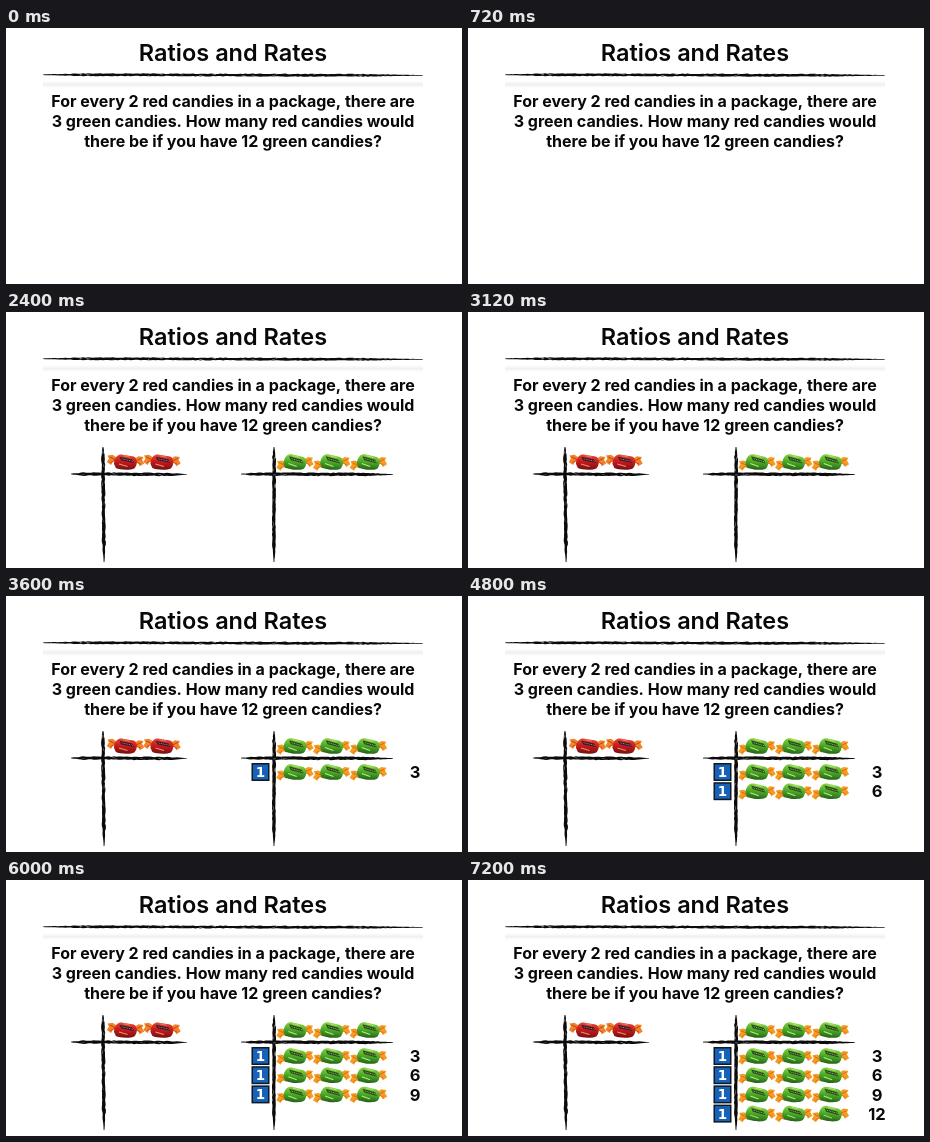
Animation of 456x256 px, one loop 8000 ms. Source, as an HTML page with a canvas:

```html
<!DOCTYPE html>
<html lang="en">
<head>
<meta charset="utf-8">
<title>Ratios and Rates</title>
<style>
  html, body { margin: 0; width: 100%; height: 100%; overflow: hidden; background: #fff; }
  canvas { display: block; width: 456px; height: 256px; }
</style>
</head>
<body>
<canvas id="stage" width="456" height="256"></canvas>
<script>
const ctx = document.getElementById('stage').getContext('2d');
const LOOP = 8000, STEP = 1200;
const SANS = 'Inter, Lato, sans-serif';

function text(str, x, y, size, weight = 700, color = '#080808', family = SANS) {
  ctx.font = `${weight} ${size}px ${family}`;
  ctx.textAlign = 'center';
  ctx.fillStyle = color;
  ctx.fillText(str, x, y);
}

function seeded(seed) {
  return () => (seed = (seed * 16807) % 2147483647) / 2147483647;
}

// A rough, tapering ink stroke
function brush(x1, y1, x2, y2, width, seed) {
  const rnd = seeded(seed);
  const length = Math.hypot(x2 - x1, y2 - y1);
  const count = Math.round(length / 2.5);
  const upper = [], lower = [];
  for (let i = 0; i <= count; i++) {
    const u = i / count;
    const half = width / 2 * Math.min(1, 0.3 + 7 * u, 0.2 + 5 * (1 - u));
    upper.push([u * length, -half * (0.75 + 0.5 * rnd())]);
    lower.unshift([u * length, half * (0.75 + 0.5 * rnd())]);
  }
  ctx.save();
  ctx.translate(x1, y1);
  ctx.rotate(Math.atan2(y2 - y1, x2 - x1));
  shape('#0b0b0b', [...upper, ...lower]);
  ctx.fillStyle = 'rgba(255,255,255,.5)';
  for (let i = 0; i < length / 14; i++) {
    ctx.fillRect(rnd() * length, (rnd() - 0.5) * width, 1 + rnd() * 3, 0.6);
  }
  ctx.restore();
}

function shape(color, points) {
  ctx.fillStyle = color;
  ctx.beginPath();
  points.forEach(([x, y]) => ctx.lineTo(x, y));
  ctx.closePath();
  ctx.fill();
}

function line(color, width, x1, y1, x2, y2) {
  ctx.strokeStyle = color;
  ctx.lineWidth = width;
  ctx.beginPath();
  ctx.moveTo(x1, y1);
  ctx.lineTo(x2, y2);
  ctx.stroke();
}

// Twisted wrapper end; dir is -1 for left, 1 for right
function twist(dir, dy, color, shade) {
  const at = (x, y) => [dir * x, y + dy];
  shape(color, [at(12, -3), at(18, -7), at(25, -6), at(23, -2), at(26, 3), at(20, 7), at(17, 2), at(12, 4)]);
  line(shade, 1.2, dir * 14, dy, dir * 22, dy - 4);
  line(shade, 1, dir * 15, dy + 1, dir * 21, dy + 4);
}

const RED = {
  ends: [-3, -1], tilt: 0.04, end: '#f0842a', endShade: '#b93212',
  body: ['#e54634', '#c5191b', '#70100f'], label: '#3b1a2b', accent: '#e9a18c', shine: '#f58d75'
};
const GREEN = {
  ends: [5, 0], tilt: 0.1, end: '#f59b24', endShade: '#cf650c',
  body: ['#8bd443', '#4aa927', '#246018'], label: '#284b22', accent: '#d2cf55', shine: '#b7ee7b'
};

function candy(kind, x, y, scale) {
  ctx.save();
  ctx.translate(x, y);
  ctx.scale(scale, scale);
  twist(-1, kind.ends[0], kind.end, kind.endShade);
  twist(1, kind.ends[1], kind.end, kind.endShade);
  ctx.rotate(kind.tilt);

  const fill = ctx.createLinearGradient(0, -10, 0, 11);
  kind.body.forEach((color, i) => fill.addColorStop(i / 2, color));
  ctx.fillStyle = fill;
  ctx.beginPath();
  ctx.moveTo(-16, 3);
  ctx.bezierCurveTo(-15, -8, -10, -11, -4, -10);
  ctx.lineTo(11, -8);
  ctx.bezierCurveTo(17, -6, 17, 4, 13, 8);
  ctx.bezierCurveTo(7, 12, -8, 11, -13, 9);
  ctx.closePath();
  ctx.fill();

  shape(kind.label, [[-9, -7], [9, -4], [12, 1], [-6, -2]]);
  for (let i = 0; i < 5; i++) {
    const px = -5 + i * 3.3;
    line(kind.accent, 1, px, -4.7 + i * 0.6, px + 1.6, -3.2 + i * 0.6);
  }
  line(kind.shine, 1.4, -9, 3, 3, 6);
  line(kind.shine, 1, -4, -8.5, 6, -7);
  ctx.restore();
}

function candies(kind, count, x, y, pitch, scale) {
  for (let i = 0; i < count; i++) candy(kind, x + i * pitch, y, scale);
}

function heading() {
  text('Ratios and Rates', 227, 33, 23.5, 600);
  brush(37, 46.7, 417, 47.4, 2.5, 41);
  const glow = ctx.createLinearGradient(0, 53, 0, 60);
  glow.addColorStop(0, 'rgba(0,0,0,0)');
  glow.addColorStop(0.5, 'rgba(0,0,0,.06)');
  glow.addColorStop(1, 'rgba(0,0,0,0)');
  ctx.fillStyle = glow;
  ctx.fillRect(37, 53, 380, 7);

  text('For every 2 red candies in a package, there are', 227, 79, 16);
  text('3 green candies. How many red candies would', 227, 98.5, 16);
  text('there be if you have 12 green candies?', 227, 118.5, 16);
}

function ratio() {
  candies(RED, 2, 146.5, 169, 51.5, 1);
  candies(GREEN, 3, 259, 169, 52, 1);
  text('2', 200, 212, 24);
  text(':', 227, 212, 22);
  text('3', 254, 212, 24);
}

function tables() {
  brush(97, 135, 98, 250, 3.4, 17);
  brush(65, 162, 181, 162.5, 3, 23);
  brush(268, 135, 268, 250, 3.4, 31);
  brush(235, 162, 387, 162.5, 3, 47);
  candies(RED, 2, 119.5, 150, 36.5, 0.72);
  candies(GREEN, 3, 289, 150, 36.7, 0.72);
}

function tableRow(index) {
  const y = 176 + index * 19.2;
  ctx.fillStyle = '#101820';
  ctx.fillRect(245.5, y - 9, 18, 18);
  ctx.fillStyle = '#1762b9';
  ctx.fillRect(247, y - 7.5, 15, 15);
  text('1', 254.5, y + 5, 13.5, 700, '#fff', '"DejaVu Sans", sans-serif');
  candies(GREEN, 3, 289, y, 36.7, 0.72);
  text(String(3 * (index + 1)), 409, y + 6.2, 16.5);
}

function draw(now) {
  const step = Math.floor((now % LOOP) / STEP);
  ctx.fillStyle = '#fff';
  ctx.fillRect(0, 0, 456, 256);
  heading();
  if (step === 1) ratio();
  if (step >= 2) tables();
  for (let i = 0; i < step - 2; i++) tableRow(i);
}

let start;
function tick(now) {
  start ??= now;
  draw(now - start);
  requestAnimationFrame(tick);
}
draw(0);
requestAnimationFrame(tick);
</script>
</body>
</html>
```
